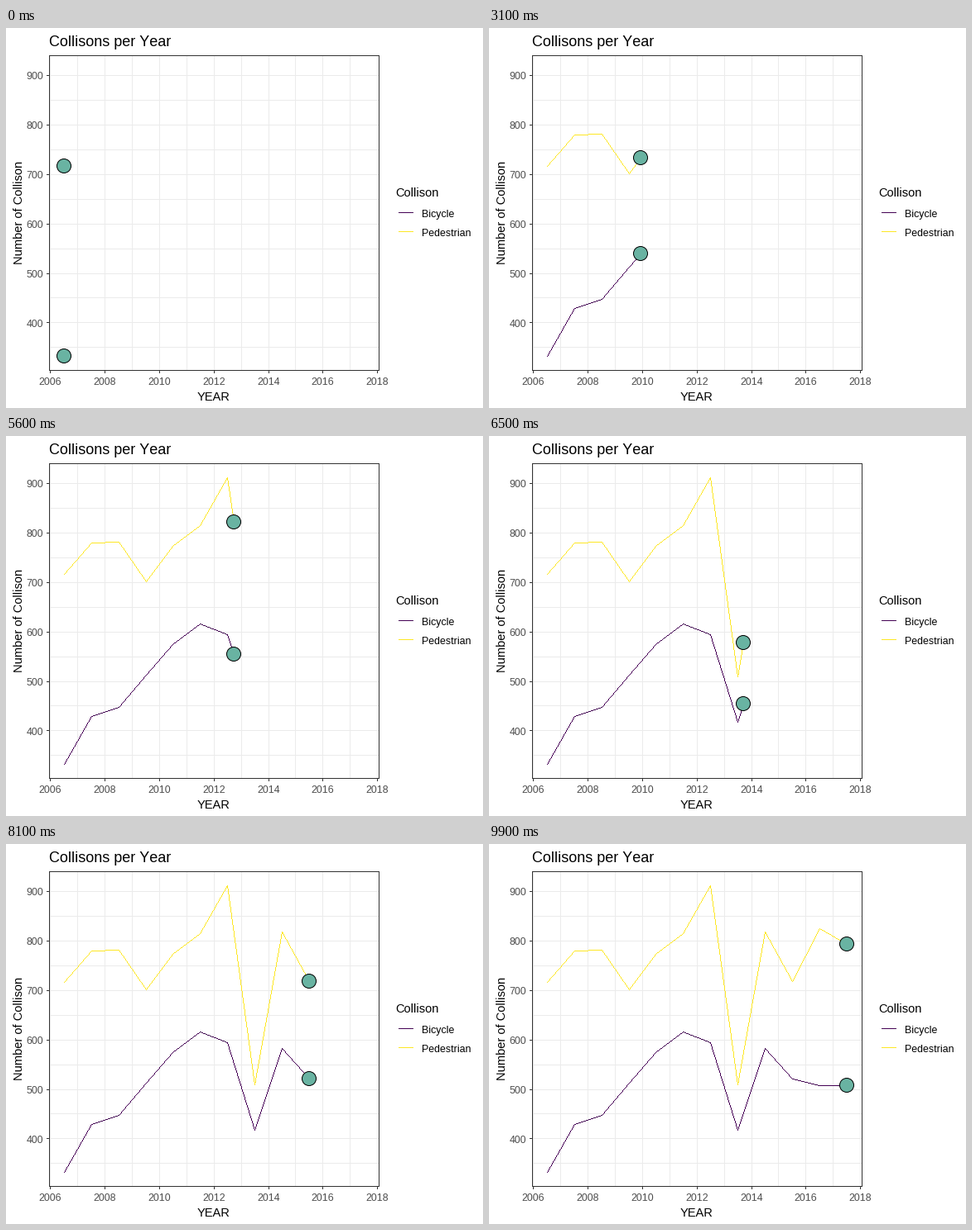
A matplotlib script for the animation above (10 s loop, 576 by 460 pixels).

```python
import matplotlib.pyplot as plt
import numpy as np
from matplotlib.animation import FuncAnimation
from matplotlib.collections import LineCollection
from matplotlib.patches import Circle, Rectangle

W, H, DPI = 576, 460, 64
PX = 72 / DPI  # points per pixel
FRAMES, INTERVAL = 100, 100

LEFT, RIGHT, TOP, BOTTOM = 52, 450, 33, 414
GRID, DARK, TICK_TEXT = "#ebebeb", "#333333", "#4d4d4d"
TEAL = "#69b3a2"

years = np.arange(2006.5, 2018)
series = {
    "Bicycle": ("#440154", [332, 429, 447, 512, 574, 616,
                            594, 417, 583, 521, 508, 508]),
    "Pedestrian": ("#fde725", [717, 780, 782, 702, 774, 816,
                               912, 510, 818, 718, 825, 794]),
}

plt.rcParams["font.family"] = "Liberation Sans"
plt.rcParams["text.kerning_factor"] = 12  # plain advances, no kerning
fig = plt.figure(figsize=(W / DPI, H / DPI), dpi=DPI, facecolor="white")
ax = fig.add_axes([0, 0, 1, 1])
ax.set(xlim=(0, W), ylim=(H, 0))
ax.axis("off")


def to_x(year):
    return 53.4 + (np.asarray(year) - 2006) * 32.9


def to_y(count):
    return 57.4 + (900 - np.asarray(count)) * 0.598


def pixel(v):
    return np.floor(np.asarray(v) + 0.5)


def rule(xs, ys, color):
    ax.plot(xs, ys, color=color, lw=PX, antialiased=False,
            solid_capstyle="butt", zorder=1)


def label(x, y, text, size, color="black", ha="left", **kw):
    ax.text(x, y, text, fontsize=size * PX, color=color, ha=ha,
            va="baseline", **kw)


def crisp_path(xs, ys):
    """One-pixel dashes that trace a polyline without smoothing."""
    corners = pixel(np.column_stack([xs, ys]))
    parts = [corners[:1]]
    for a, b in zip(corners, corners[1:]):
        n = int(np.abs(b - a).max())
        parts.append(pixel(np.linspace(a, b, n + 1)))
    start = np.concatenate(parts) + [0, 0.5]
    return np.stack([start, start + [1, 0]], axis=1)


# Grid, ticks and tick labels
for year in range(2006, 2019):
    x = pixel(to_x(year))
    rule([x, x], [TOP, BOTTOM], GRID)
    if year % 2 == 0:
        rule([x, x], [BOTTOM, BOTTOM + 3], DARK)
        label(x, 432, str(year), 12.4, TICK_TEXT, "center")

for count in range(350, 901, 50):
    y = pixel(to_y(count))
    rule([LEFT, RIGHT], [y, y], GRID)
    if count % 100 == 0:
        rule([LEFT - 3, LEFT], [y, y], DARK)
        label(45, y + 5.5, str(count), 12.4, TICK_TEXT, "right")

ax.add_patch(Rectangle((LEFT, TOP), RIGHT - LEFT, BOTTOM - TOP,
                       fill=False, ec=DARK, lw=PX, antialiased=False,
                       zorder=5))

# Titles and legend
label(51.5, 22, "Collisons per Year", 18)
label(250.5, 451, "YEAR", 14.67, ha="center")
ax.text(20, 223.5, "Number of Collison", fontsize=14.67 * PX, rotation=90,
        rotation_mode="anchor", ha="center", va="baseline")
label(470.5, 204, "Collison", 14.67)
for i, (name, (color, _)) in enumerate(series.items()):
    y = 223 + 23 * i
    rule([474, 491], [y, y], color)
    label(502, y + 6, name, 12.4)

# Animated parts
tracks = []
for color, counts in series.values():
    line = LineCollection([], colors=color, linewidths=PX, capstyle="butt",
                          snap=False, zorder=3)
    ax.add_collection(line, autolim=False)
    dot = ax.add_patch(Circle((0, 0), 8.5, fc=TEAL, ec="black", lw=PX,
                              zorder=4))
    tracks.append((line, dot, to_x(years), to_y(counts)))


def update(frame):
    pos = frame * (len(years) - 1) / (FRAMES - 1)
    steps = np.arange(len(years))
    path = np.append(steps[steps < pos], pos)
    for line, dot, xs, ys in tracks:
        px, py = np.interp(path, steps, xs), np.interp(path, steps, ys)
        line.set_segments(crisp_path(px, py))
        dot.center = pixel(px[-1]), pixel(py[-1])
    return [artist for track in tracks for artist in track[:2]]


anim = FuncAnimation(fig, update, frames=FRAMES, interval=INTERVAL,
                     repeat=True, repeat_delay=0, blit=False)
plt.show()
```
